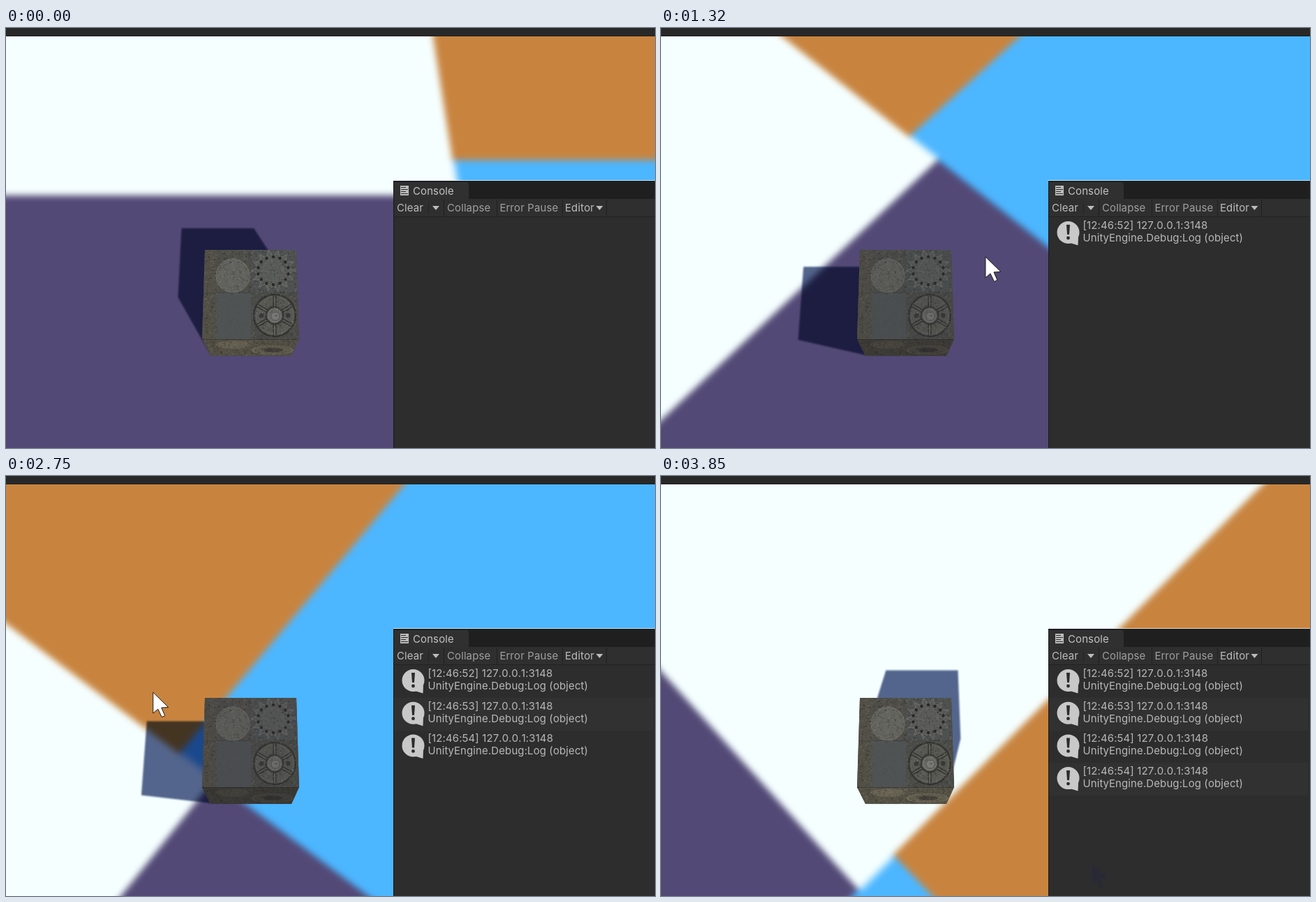
Recreate the animation shown at these times as an HTML page with a canvas. Size 930 by 602 pixels, loop 4440 ms.

```html
<!DOCTYPE html>
<html lang="en">
<head>
<meta charset="utf-8">
<title>Cube on tiles</title>
<style>
html, body { margin: 0; width: 100%; height: 100%; overflow: hidden; background: #2d2d2d; }
canvas { display: block; }
</style>
</head>
<body>
<canvas id="stage" width="930" height="602"></canvas>
<script>
const W = 930, H = 602, LOOP = 4440, PAD = 30;
const ctx = document.getElementById('stage').getContext('2d');

function layer(w, h) {
  const c = document.createElement('canvas');
  c.width = w; c.height = h;
  return c.getContext('2d');
}

// time, yaw in degrees, tile corner relative to the cube (right, forward)
const POSES = [
  [290, 0, 321, 194], [990, 19.2, 306, 180], [1320, 46.8, 223.7, 138.7],
  [2060, 64.4, 171, 117], [2750, 53, -48, 28], [3290, -5.9, -27.5, -98],
  [3850, -45.5, 77, -161]
];
const POINTER = [
  [330, 480, 362], [990, 475, 345], [1320, 465, 328], [2060, 453, 248],
  [2750, 211, 310], [3290, 179, 398], [3850, 617, 555]
];
const LOGS = [[530, '12:46:52'], [1350, '12:46:53'], [2170, '12:46:54'], [2990, '12:46:54']];

// Smooth curve through keyed values
function sample(keys, t) {
  const last = keys.length - 1;
  if (t <= keys[0][0]) return keys[0].slice(1);
  if (t >= keys[last][0]) return keys[last].slice(1);
  let i = 0;
  while (t >= keys[i + 1][0]) i++;
  const a = keys[i], b = keys[i + 1], dt = b[0] - a[0], s = (t - a[0]) / dt;
  const slope = (n, j) => {
    if (n === 0) return 0;
    const p = keys[n - 1], q = keys[Math.min(n + 1, last)];
    return (q[j] - p[j]) / (q[0] - p[0]);
  };
  return a.slice(1).map((v, n) => {
    const j = n + 1, s2 = s * s, s3 = s2 * s;
    return (2 * s3 - 3 * s2 + 1) * v + (3 * s2 - 2 * s3) * b[j] +
      (s3 - 2 * s2 + s) * dt * slope(i, j) + (s3 - s2) * dt * slope(i + 1, j);
  });
}

// Ground plane seen by the tilted camera
const CUBE_Z = -28;
function project(x, z) {
  const w = 1 + 0.00047 * z;
  return [350 + x / w, 387 - 0.955 * z / w];
}

function poly(g, pts, fill) {
  g.beginPath();
  pts.forEach(p => g.lineTo(p[0], p[1]));
  g.closePath();
  if (fill) { g.fillStyle = fill; g.fill(); }
}

function disc(g, x, y, r, fill, stroke, width = 1) {
  g.beginPath();
  g.arc(x, y, r, 0, Math.PI * 2);
  if (fill) { g.fillStyle = fill; g.fill(); }
  if (stroke) { g.strokeStyle = stroke; g.lineWidth = width; g.stroke(); }
}

function rect(g, x, y, w, h, fill) {
  g.fillStyle = fill;
  g.fillRect(x, y, w, h);
}

const ground = layer(W + 2 * PAD, H + 2 * PAD);

function drawGround(yaw, r0, u0) {
  const c = Math.cos(yaw), s = Math.sin(yaw), FAR = 1250, STEP = 63;
  const at = (r, u) => {
    r += r0; u += u0;
    const p = project(r * c - u * s, r * s + u * c + CUBE_Z);
    return [p[0] + PAD, p[1] + PAD];
  };
  const tile = (r1, u1, r2, u2, color) =>
    poly(ground, [at(r1, u1), at(r2, u1), at(r2, u2), at(r1, u2)], color);
  rect(ground, 0, 0, W + 2 * PAD, H + 2 * PAD, '#534976');
  tile(-FAR, 0, 1, FAR, '#f5ffff');
  tile(0, -FAR, FAR, STEP + 1, '#4cb6ff');
  tile(0, STEP, FAR, FAR, '#c8843f');
  tile(0, 2, 5, STEP - 2, '#a2daff');
  ctx.filter = 'blur(5px)';
  ctx.drawImage(ground.canvas, -PAD, -PAD);
  ctx.filter = 'none';
}

function drawShadow(dx, dz) {
  const R = 54.5;
  const square = (x, z) => [[-R, -R], [R, -R], [R, R], [-R, R]].map(p => [x + p[0], z + p[1]]);
  const pts = [...square(0, CUBE_Z), ...square(dx, CUBE_Z + dz)].sort((a, b) => a[0] - b[0] || a[1] - b[1]);
  const half = list => {
    const out = [];
    for (const p of list) {
      while (out.length > 1) {
        const a = out[out.length - 2], b = out[out.length - 1];
        if ((b[0] - a[0]) * (p[1] - a[1]) - (b[1] - a[1]) * (p[0] - a[0]) > 0) break;
        out.pop();
      }
      out.push(p);
    }
    return out.slice(0, -1);
  };
  const hull = [...half(pts), ...half([...pts].reverse())].map(p => project(...p));
  ctx.globalCompositeOperation = 'multiply';
  ctx.filter = 'blur(1.3px)';
  poly(ctx, hull, 'rgb(86,101,140)');
  ctx.filter = 'none';
  ctx.globalCompositeOperation = 'source-over';
}

const TOP = [[285, 318], [416, 318], [420, 446], [281, 446]];
const FRONT = [[281, 446], [420, 446], [409, 470], [293, 470]];

// Stone cube, painted once
const stone = layer(W, H);
(function paintCube(g) {
  let seed = 7;
  const rnd = () => (seed = (seed * 16807) % 2147483647) / 2147483647;
  const spoke = (a, from, to, color, width) => {
    g.beginPath();
    g.moveTo(385 + from * Math.cos(a), 412 + from * Math.sin(a));
    g.lineTo(385 + to * Math.cos(a), 412 + to * Math.sin(a));
    g.strokeStyle = color; g.lineWidth = width; g.stroke();
  };
  g.save();
  poly(g, [TOP[0], TOP[1], TOP[2], FRONT[2], FRONT[3], TOP[3]]);
  g.clip();
  rect(g, 280, 317, 142, 155, '#504f4a');
  rect(g, 280, 317, 21, 130, '#545148');
  rect(g, 351, 317, 70, 63, '#505251');
  rect(g, 301, 380, 50, 66, '#515455');
  rect(g, 351, 380, 70, 66, '#4d4d49');
  rect(g, 280, 446, 142, 25, '#575346');

  disc(g, 325, 355, 24, '#65655f', '#75756e', 1);

  const star = [];
  for (let i = 0; i < 28; i++) {
    const a = i * Math.PI / 14, r = i % 2 ? 22 : 32;
    star.push([383 + r * Math.cos(a), 348 + r * 0.93 * Math.sin(a)]);
  }
  poly(g, star, '#5a5b59');
  g.strokeStyle = '#757673'; g.lineWidth = 1; g.stroke();
  disc(g, 383, 348, 15, '#5b5c59', '#676864');
  for (let i = 0; i < 14; i++) {
    const a = (i + 0.5) * Math.PI / 7;
    disc(g, 383 + 22 * Math.cos(a), 348 + 20 * Math.sin(a), 2.2, '#292724');
  }

  disc(g, 385, 412, 30, '#4f4f4b', '#31312e', 2);
  disc(g, 385, 412, 27, '#595953', '#6b6b66');
  for (let i = 0; i < 6; i++) {
    const a = (i + 0.5) * Math.PI / 3;
    spoke(a, 12, 28, '#363632', 5);
    spoke(a, 12, 28, '#63635e', 2);
  }
  disc(g, 366, 412, 3.5, '#3a3a37');
  disc(g, 404, 412, 3.5, '#3a3a37');
  disc(g, 385, 412, 13, '#42423f', '#2f2f2c');
  disc(g, 385, 412, 10, '#6b6b67', '#83837e');
  disc(g, 386, 413, 6, '#7b7b77', '#565652');

  g.save();
  g.translate(0, 454);
  g.scale(1, 0.22);
  disc(g, 325, 0, 24, '#6a6554', '#777160');
  disc(g, 382, 35, 29, '#635e4f', '#7b7563', 2);
  disc(g, 382, 35, 15, '#45423a');
  g.restore();

  for (let i = 0; i < 3600; i++) {
    const x = 281 + rnd() * 139, y = 318 + rnd() * 152;
    const smooth = x > 301 && x < 351 && y > 380 && y < 446;
    const a = rnd() * (smooth ? 0.05 : 0.26);
    rect(g, x, y, 1 + rnd() * 1.5, 1 + rnd(), rnd() < 0.55 ? `rgba(20,20,20,${a})` : `rgba(155,155,146,${a})`);
  }
  rect(g, 281, 379, 139, 1, 'rgba(30,30,28,.25)');
  rect(g, 281, 446, 139, 1, 'rgba(30,30,28,.4)');
  g.restore();
})(stone);

function drawCube(light) {
  ctx.drawImage(stone.canvas, 0, 0);
  const dim = 1 - Math.max(0, light);
  poly(ctx, TOP, `rgba(50,53,60,${0.25 * dim})`);
  poly(ctx, FRONT, `rgba(32,33,37,${0.62 * dim})`);
}

function text(str, x, y, color = '#b8b8b8') {
  ctx.fillStyle = color;
  ctx.fillText(str, x, y);
}

function drawLog(i, stamp) {
  const y = 271 + i * 46.7;
  if (i % 2) rect(ctx, 556, Math.round(y), 371, 47, '#313131');
  disc(ctx, 583.5, y + 22, 16, '#c8c8c8');
  poly(ctx, [[586, y + 37], [598, y + 29], [597.5, y + 40.5]], '#c8c8c8');
  poly(ctx, [[581, y + 11], [586, y + 11], [585, y + 25], [582, y + 25]], '#2b2b2b');
  disc(ctx, 583.5, y + 30, 2.4, '#2b2b2b');
  text(`[${stamp}] 127.0.0.1:3148`, 604.5, y + 17);
  text('UnityEngine.Debug:Log (object)', 604.5, y + 35);
}

function drawConsole(t) {
  ctx.font = '15px Inter, sans-serif';
  ctx.fontKerning = 'none';
  ctx.letterSpacing = '0.1px';
  rect(ctx, 555, 218, 375, 1, 'rgba(235,240,250,.75)');
  rect(ctx, 555, 219, 375, 383, '#1b1b1b');
  rect(ctx, 556, 220, 374, 25, '#1f1f1f');
  ctx.fillStyle = '#303030';
  ctx.beginPath();
  ctx.roundRect(556, 221, 107, 25, [0, 3, 0, 0]);
  ctx.fill();
  rect(ctx, 556, 245, 374, 25, '#2f2f2f');
  rect(ctx, 556, 270, 374, 1, '#222');
  rect(ctx, 556, 271, 374, 331, '#2d2d2d');
  for (const x of [627, 703, 797, 860]) rect(ctx, x, 246, 1, 24, '#202020');
  rect(ctx, 605, 250, 1, 15, '#242424');

  rect(ctx, 565, 226, 12, 14, '#bdbdbd');
  for (let i = 0; i < 4; i++) rect(ctx, 566, 228 + i * 3, i % 2 ? 10 : 7, 1, '#303030');
  text('Console', 583, 239, '#c2c2c2');
  text('Clear', 560, 263, '#bcbcbc');
  text('Collapse', 632, 263, '#9f9f9f');
  text('Error Pause', 707.5, 263, '#9f9f9f');
  text('Editor', 801, 263, '#bcbcbc');
  for (const x of [616, 850.5]) poly(ctx, [[x - 5, 255], [x + 5, 255], [x, 261]], '#bcbcbc');
  LOGS.forEach(([start, stamp], i) => { if (t >= start) drawLog(i, stamp); });
}

function drawPointer(t) {
  if (t < POINTER[0][0]) return;
  const [x, y] = sample(POINTER, t), lit = t < 3820;
  poly(ctx, [[0, 0], [0, 30], [7, 24], [12.5, 35.5], [17, 33.5], [12, 22], [22, 21.5]]
    .map(p => [x + p[0], y + p[1]]), lit ? '#fff' : '#292936');
  if (lit) {
    ctx.strokeStyle = '#1c1710';
    ctx.lineWidth = 1;
    ctx.stroke();
  }
}

function draw(t) {
  const [deg, r, u] = sample(POSES, t);
  const yaw = deg * Math.PI / 180, sun = yaw + 120.4 * Math.PI / 180;
  drawGround(yaw, r, u);
  drawShadow(97 * Math.cos(sun), 97 * Math.sin(sun));
  drawCube(Math.sin(sun));
  rect(ctx, 0, 0, W, 12, '#282828');
  rect(ctx, 0, 11, W, 1, '#202020');
  drawConsole(t);
  drawPointer(t);
}

const began = performance.now();
function tick() {
  draw((performance.now() - began) % LOOP);
  requestAnimationFrame(tick);
}
tick();
</script>
</body>
</html>
```
